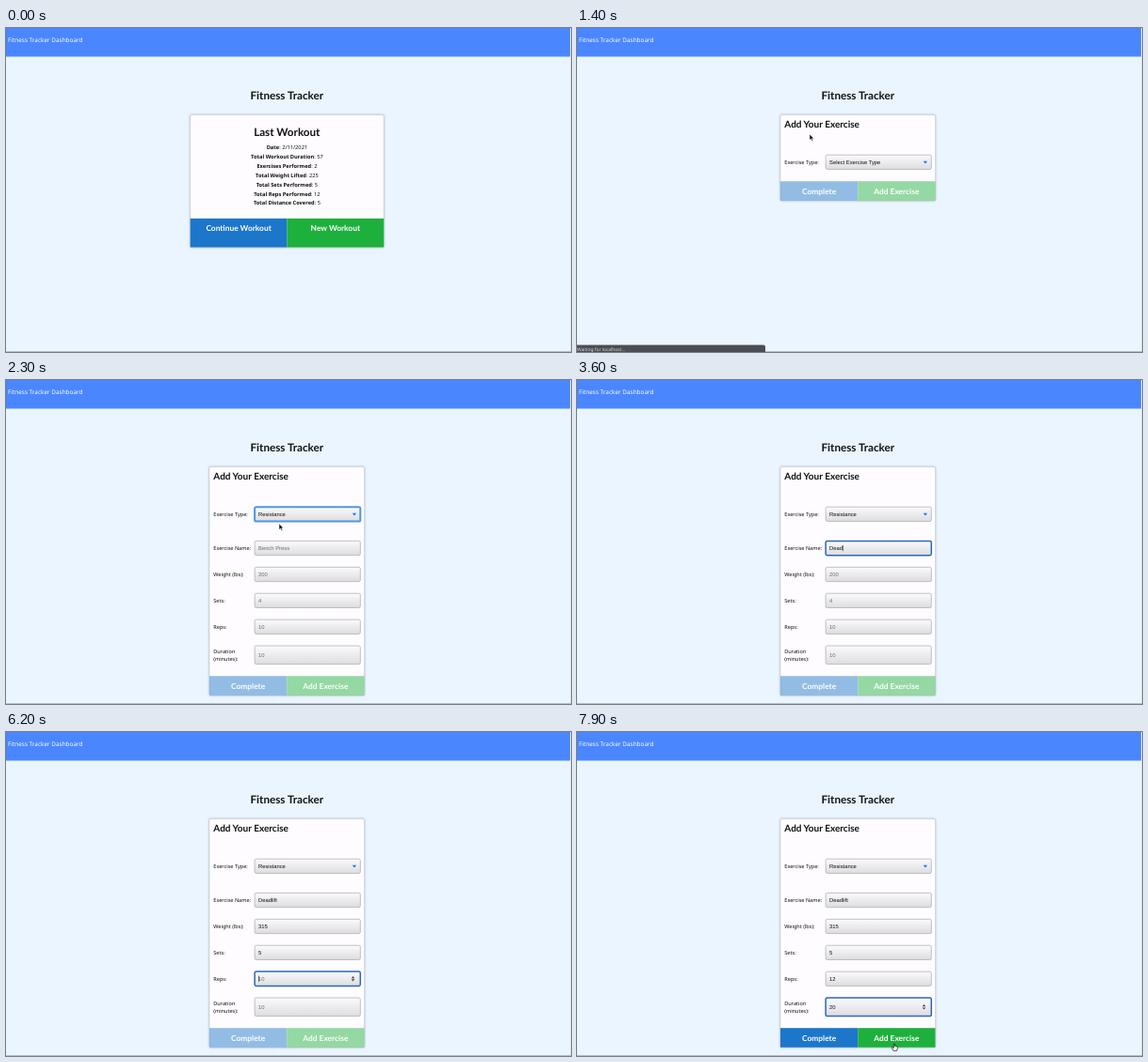
Recreate the animation shown at these times as an HTML page. Size 600 px wide and 345 px high, loop 8000 ms.

```html
<!DOCTYPE html>
<html lang="en">
<head>
<meta charset="utf-8">
<title>Fitness Tracker</title>
<style>
  html, body { margin: 0; width: 100%; height: 100%; overflow: hidden; background: #ebf5ff; }
  svg { display: block; width: 100%; height: 100%; }
  text { font-family: "Noto Sans", "Open Sans", sans-serif; font-size: 5.57px; fill: #111; text-rendering: geometricPrecision; white-space: pre; }
  .mid { text-anchor: middle; }
  .lato { font-family: Lato, sans-serif; font-weight: 700; }
  .h1 { font-size: 11.67px; }
  .h2 { font-size: 10px; }
  .btn { font-size: 8.4px; fill: #fff; }
  .stat { font-size: 5.7px; }
  .bold { font-weight: 700; }
  .value { font-family: "Liberation Sans", Arial, sans-serif; font-size: 5.83px; }
  .hint { fill: #6e6e6e; }
  .box { fill: url(#field); stroke: #b2b2b4; stroke-width: .8; }
  .box.focus { stroke: #2b69b3; stroke-width: 1.5; }
  .box.glow { stroke: #4f97e2; stroke-width: 2; }
  .card { fill: #fefcff; stroke: #ccd1d8; stroke-width: .6; filter: drop-shadow(0 .8px 1.2px rgba(0, 0, 0, .28)); }
</style>
</head>
<body>
<svg id="stage" viewBox="0 0 600 345" preserveAspectRatio="none">
  <defs>
    <linearGradient id="field" x2="0" y2="1">
      <stop offset="0" stop-color="#fbfafc"/>
      <stop offset="1" stop-color="#dddcde"/>
    </linearGradient>
  </defs>
  <rect width="600" height="345" fill="#ebf5ff"/>
  <rect width="599" height="30.5" fill="#4a87ff"/>
  <rect x="599" width="1" height="345" fill="#e6eaee"/>
  <rect y="344" width="600" height="1" fill="#b4bcc4"/>
  <text x="2" y="15.3" style="font-size:6.4px;fill:#fff">Fitness Tracker Dashboard</text>
  <text class="lato h1 mid" x="298.3" y="75.6">Fitness Tracker</text>
  <g id="home"></g>
  <g id="form"></g>
  <g id="status">
    <path d="M0 337.5H198a2 2 0 0 1 2 2V345H0Z" fill="#4b4d52"/>
    <text x="0" y="343.7" style="font-size:4.9px;fill:#dcdde0">Waiting for localhost...</text>
  </g>
  <g id="pointer" stroke-linejoin="round">
    <path id="arrow" d="M0 0V6.4L1.5 5.1 2.6 7.5 3.7 7 2.6 4.7H4.6Z" fill="#111" stroke="#fff" stroke-width=".5"/>
    <path id="hand" d="M-.6 0Q0-.6.6 0V2.4L3 3Q3.6 3.3 3.4 4.4L2.7 7.4H-1L-2.7 4.6Q-2.9 3.6-1.8 3.8L-.6 4.6Z" fill="#fff" stroke="#111" stroke-width=".7"/>
  </g>
</svg>
<script>
const LOOP = 8000, STEP = 100;
const PAGE_SWITCH = 1100, STATUS_ON = 900, STATUS_OFF = 1700;
const SELECT_FOCUS = 1900, FORM_OPEN = 2100, BUTTONS_ON = 7300;

const byId = id => document.getElementById(id);

function add(parent, tag, attrs = {}, content = "") {
  const node = document.createElementNS("http://www.w3.org/2000/svg", tag);
  for (const key in attrs) node.setAttribute(key, attrs[key]);
  node.textContent = content;
  parent.append(node);
  return node;
}
const show = (node, on) => node.setAttribute("visibility", on ? "visible" : "hidden");
const label = (parent, cls, x, y, content) => add(parent, "text", { class: cls, x, y }, content);

function buttons(parent, left, right, height, textY, names) {
  const group = add(parent, "g"), half = (right - left) / 2;
  names.forEach((name, i) => {
    const x = left + i * half;
    add(group, "rect", { x, y: 0, width: half, height, fill: i ? "#1eb03d" : "#1c76ca" });
    label(group, "lato btn mid", x + half / 2, textY, name);
  });
  return group;
}

// Summary page
const home = byId("home");
add(home, "rect", { class: "card", x: 195.7, y: 92.5, width: 205.5, height: 141, rx: 1.5 });
label(home, "lato h1 mid", 298.3, 114.7, "Last Workout");
[["Date", "2/11/2021"], ["Total Workout Duration", 57], ["Exercises Performed", 2],
 ["Total Weight Lifted", 225], ["Total Sets Performed", 5], ["Total Reps Performed", 12],
 ["Total Distance Covered", 5]].forEach(([name, value], i) => {
  const line = label(home, "stat mid", 298.4, 129.4 + 9.83 * i, "");
  add(line, "tspan", { class: "bold" }, name);
  add(line, "tspan", {}, ": " + value);
});
buttons(home, 195.7, 401.2, 30.7, 13.4, ["Continue Workout", "New Workout"])
  .setAttribute("transform", "translate(0 202.8)");

// Exercise page
const form = byId("form");
const card = add(form, "rect", { class: "card", x: 216, y: 92.5, width: 164.5, height: 91, rx: 1.5 });
label(form, "lato h2", 220.3, 106.3, "Add Your Exercise");
label(form, "", 220.3, 145.2, "Exercise Type:");
const inputBox = (parent, y, height) =>
  add(parent, "rect", { class: "box", x: 264.1, y, width: 112.2, height, rx: 1.6 });
const select = inputBox(form, 135.2, 15.3);
const choice = label(form, "value", 268, 145.1, "");
add(form, "path", { d: "M367.7 141.7h4.4l-2.2 2.8Z", fill: "#1b7ae0" });
const actions = buttons(form, 216, 380.5, 20.6, 13.7, ["Complete", "Add Exercise"]);

const details = add(form, "g");
const fields = [
  { names: ["Exercise Name:"], y: 171.4, hint: "Bench Press", value: "Deadlift", focus: 2600, blur: 4400,
    keys: [3100, 3300, 3400, 3600, 3700, 3800, 4000, 4200] },
  { names: ["Weight (lbs):"], y: 199.3, hint: "200", value: "315", focus: 4400, blur: 5600, keys: [5100, 5200, 5400] },
  { names: ["Sets:"], y: 227.2, hint: "4", value: "5", focus: 5600, blur: 6100, keys: [5900] },
  { names: ["Reps:"], y: 255.1, hint: "10", value: "12", focus: 6100, blur: 6700, keys: [6400, 6500] },
  { names: ["Duration", "(minutes):"], y: 283, height: 19.6, hint: "10", value: "20", focus: 6700, blur: LOOP,
    keys: [7300, 7500] }
];
fields.forEach((field, i) => {
  const height = field.height || 15.3, middle = field.y + height / 2;
  field.names.forEach((name, n) =>
    label(details, "", 220.3, middle + 2.3 + (n - (field.names.length - 1) / 2) * 7.8, name));
  field.box = inputBox(details, field.y, height);
  field.text = label(details, "value", 268, middle + 2.2, "");
  field.caret = add(details, "rect", { y: middle - 3.1, width: .6, height: 6.2, fill: "#111" });
  field.spinner = add(details, "path", {
    d: `M366.7 ${middle - .6}h3.6l-1.8-2.1ZM366.7 ${middle + .6}h3.6l-1.8 2.1Z`, fill: i ? "#444" : "none"
  });
});

// Pointer runs: [time, x, y]; each run ends when its last point has been shown
const runs = [
  [[100, 262, 15], [300, 256, 90], [600, 246, 205], [1100, 245, 208], [1400, 247, 113], [1600, 266, 128],
   [1800, 283, 139], [2100, 288, 147], [2300, 290, 153], [2600, 291, 173], [2700, 291, 175],
   [2800, 284, 190], [3000, 242, 320]],
  [[7700, 341, 272], [7800, 338, 306], [7900, 337, 332]]
];
function pointerAt(t) {
  const run = runs.find(r => t >= r[0][0] && t < r[r.length - 1][0] + STEP);
  if (!run) return null;
  const next = run.findIndex(p => p[0] > t);
  if (next < 0) return run[run.length - 1].slice(1);
  const [t0, x0, y0] = run[next - 1], [t1, x1, y1] = run[next];
  const k = (t - t0) / (t1 - t0);
  return [x0 + (x1 - x0) * k, y0 + (y1 - y0) * k];
}

function drawField(field, t) {
  const count = field.keys.filter(k => k <= t).length;
  const focused = t >= field.focus && t < field.blur;
  const last = count ? field.keys[count - 1] : field.focus;
  const caretOn = focused && (t - last) % 1000 < 500 && t < 7700;
  field.text.textContent = count ? field.value.slice(0, count) : field.hint;
  field.text.classList.toggle("hint", !count);
  field.box.classList.toggle("focus", focused);
  field.caret.setAttribute("x", 268 + (count ? field.text.getComputedTextLength() : 0));
  field.caret.setAttribute("opacity", caretOn ? 1 : 0);
  field.spinner.setAttribute("opacity", focused ? 1 : 0);
}

function draw(t) {
  const open = t >= FORM_OPEN;
  home.style.display = t < PAGE_SWITCH ? "" : "none";
  form.style.display = t < PAGE_SWITCH ? "none" : "";
  details.style.display = open ? "" : "none";
  show(byId("status"), t >= STATUS_ON && t < STATUS_OFF);

  card.setAttribute("height", open ? 243.3 : 91.3);
  choice.textContent = open ? "Resistance" : "Select Exercise Type";
  select.classList.toggle("glow", t >= SELECT_FOCUS && t < fields[0].focus);
  actions.setAttribute("transform", `translate(0 ${open ? 315.2 : 163.2})`);
  const fade = Math.min(1, Math.max(0, (t - BUTTONS_ON + STEP) / (2 * STEP)));
  actions.setAttribute("opacity", .47 + .53 * fade);
  if (open) fields.forEach(field => drawField(field, t));

  const at = pointerAt(t);
  byId("pointer").style.display = at ? "" : "none";
  if (at) {
    const [x, y] = at;
    const onButton = t < PAGE_SWITCH ? y > 202 : t > BUTTONS_ON && y > 315;
    byId("pointer").setAttribute("transform", `translate(${x} ${y})`);
    byId("arrow").style.display = onButton ? "none" : "";
    byId("hand").style.display = onButton ? "" : "none";
  }
}

const start = performance.now();
function tick() {
  const t = (performance.now() - start) % LOOP;
  draw(Math.floor(t / STEP) * STEP);
  requestAnimationFrame(tick);
}
tick();
</script>
</body>
</html>
```
